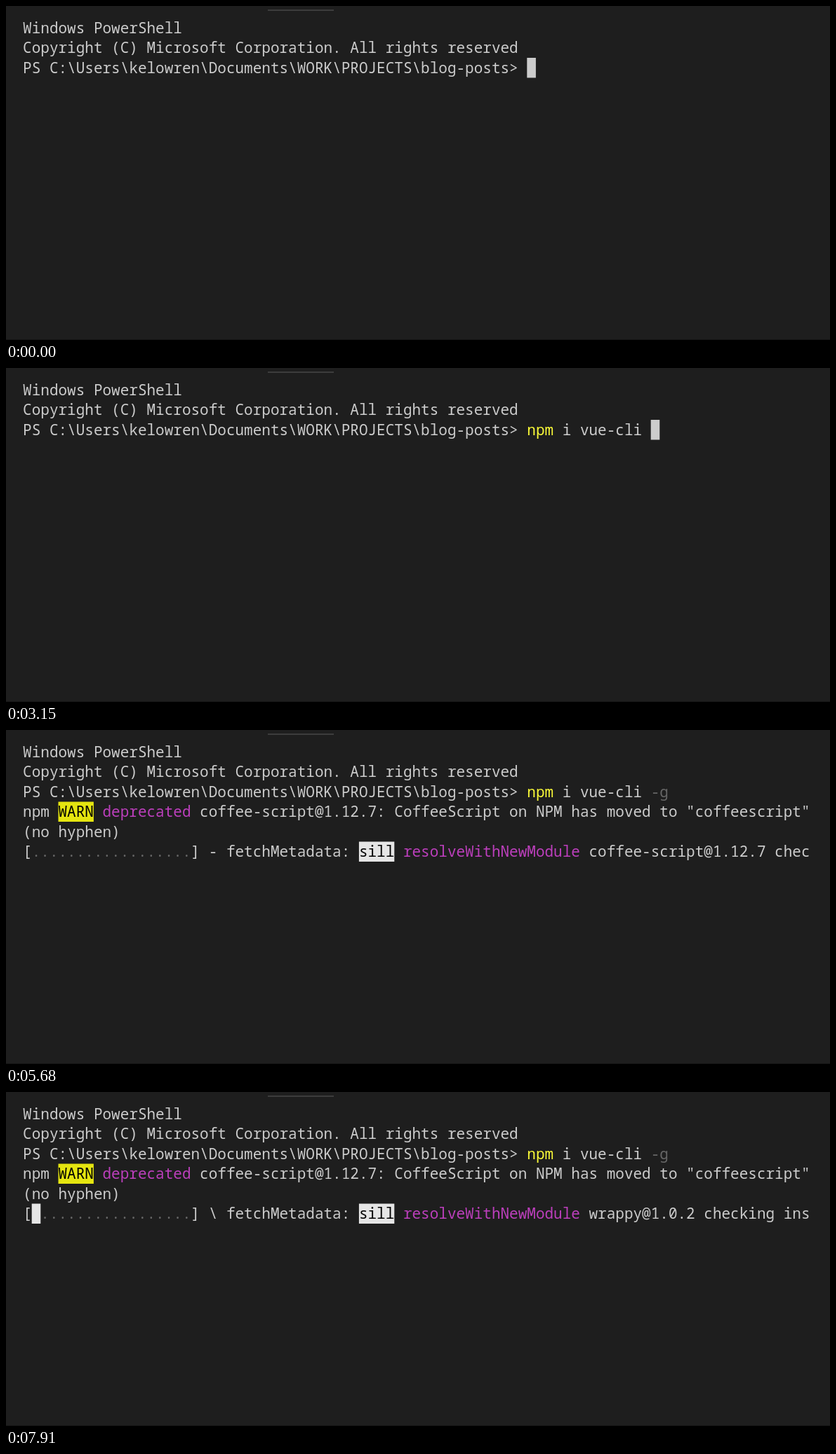
Animation of 1174x477 px, one loop 8 s. Source, as an HTML page:

```html
<!DOCTYPE html>
<html lang="en">
<head>
<meta charset="utf-8">
<title>Terminal</title>
<style>
  html, body { margin: 0; width: 100%; height: 100%; overflow: hidden; background: #1e1e1e; }
  svg { display: block; width: 1174px; height: 477px; }
  text { font: 500 21px "Noto Sans Mono", "DejaVu Sans Mono", monospace; white-space: pre; font-variant-ligatures: none; }
</style>
</head>
<body>
<svg viewBox="0 0 1174 477">
  <rect width="1174" height="477" fill="#1e1e1e"/>
  <rect x="373" y="5" width="94" height="2" fill="#3c3c3c"/>
  <rect y="476" width="1174" height="1" fill="#141414"/>
  <g id="screen"></g>
</svg>
<script>
const LOOP = 8000, COLS = 89, CELL = 12.6, LEFT = 24.1, TOP = 17, PITCH = 28.5;
const FG = '#cccccc', GRAY = '#666666', YELLOW = '#fafa38', MAGENTA = '#bc3fbc', WHITE = '#e5e5e5';
const screen = document.getElementById('screen');

// A segment is [text, colour, background]; a line is a list of segments.
const cursor = [' ', FG, FG];
const header = [
  [['Windows PowerShell']],
  [['Copyright (C) Microsoft Corporation. All rights reserved']]
];
const prompt = ['PS C:\\Users\\kelowren\\Documents\\WORK\\PROJECTS\\blog-posts> '];
const command = 'npm i vue-cli -g';
const warning = [
  [['npm '], ['WARN', '#000000', '#e5e510'], [' '], ['deprecated', MAGENTA],
   [' coffee-script@1.12.7: CoffeeScript on NPM has moved to "coffeescript"']],
  [['(no hyphen)']]
];

const typed = n => [prompt, [command.slice(0, Math.min(n, 3)), YELLOW],
  [command.slice(3, Math.min(n, 14))], [command.slice(14, n), GRAY]];
const typing = n => [...header, [...typed(n), cursor]];
const entered = (...lines) => [...header, typed(command.length), ...lines];

const progress = (done, spin, stage, level, verb, rest) => [
  ['['], [' '.repeat(done), WHITE, WHITE], ['.'.repeat(18 - done), GRAY],
  [`] ${spin} ${stage}: `], level, [' '], [verb, MAGENTA], [' ' + rest]
];
const sill = ['sill', '#000000', WHITE];
const resolve = (done, spin, pkg, stage = 'fetchMetadata') =>
  progress(done, spin, stage, sill, 'resolveWithNewModule', pkg + ' checking installable status');
const warned = (...args) => entered(...warning, resolve(...args));

const steps = [
  [0, typing(0)],
  [630, typing(3)],
  [960, typing(4)],
  [1260, typing(6)],
  [1580, typing(7)],
  [1900, typing(8)],
  [2200, typing(9)],
  [2510, typing(10)],
  [2810, typing(11)],
  [3150, typing(14)],
  [3470, typing(15)],
  [3790, typing(16)],
  [4100, entered([cursor])],
  [4400, entered(progress(0, '/', 'rollbackFailedOptional', ['verb', '#2472c8', '#000000'],
    'npm-session', '1c83f9d3a6e5c2b7'))],
  [5060, entered(progress(0, '-', 'loadIdealTree:loadAllDepsIntoIdealTree', sill, 'install', 'loadIdealTree'))],
  [5380, entered(resolve(0, '\\', 'commander@2.15.1'))],
  [5680, warned(0, '-', 'coffee-script@1.12.7')],
  [6030, warned(0, '\\', 'metalsmith@2.3.0')],
  [6310, warned(1, '-', 'bluebird@3.5.1', 'loadDep:rimraf')],
  [6640, warned(1, '\\', 'glob@7.1.2')],
  [6930, warned(1, '|', 'minimatch@3.0.4')],
  [7270, warned(1, '|', 'inflight@1.0.6')],
  [7590, warned(1, '/', 'once@1.4.0')],
  [7910, warned(1, '\\', 'wrappy@1.0.2')]
];

function add(tag, attrs, content = '') {
  const el = document.createElementNS('http://www.w3.org/2000/svg', tag);
  for (const key in attrs) el.setAttribute(key, attrs[key]);
  el.textContent = content;
  screen.append(el);
}

function drawLine(line, row) {
  const y = TOP + PITCH * row;
  let col = 0;
  for (const [full, color = FG, back] of line) {
    const str = full.slice(0, COLS - col);
    const x = LEFT + col * CELL;
    col += str.length;
    if (!str) continue;
    if (back) add('rect', { x, y, width: str.length * CELL, height: PITCH, fill: back });
    if (str.trim()) add('text', { x, y: Math.floor(y) + 22, fill: color }, str);
  }
}

const start = performance.now();
let shown = null;
function frame() {
  const t = (performance.now() - start) % LOOP;
  const step = steps.findLast(s => s[0] <= t);
  if (step !== shown) {
    shown = step;
    screen.replaceChildren();
    step[1].forEach(drawLine);
  }
  requestAnimationFrame(frame);
}
frame();
</script>
</body>
</html>
```
